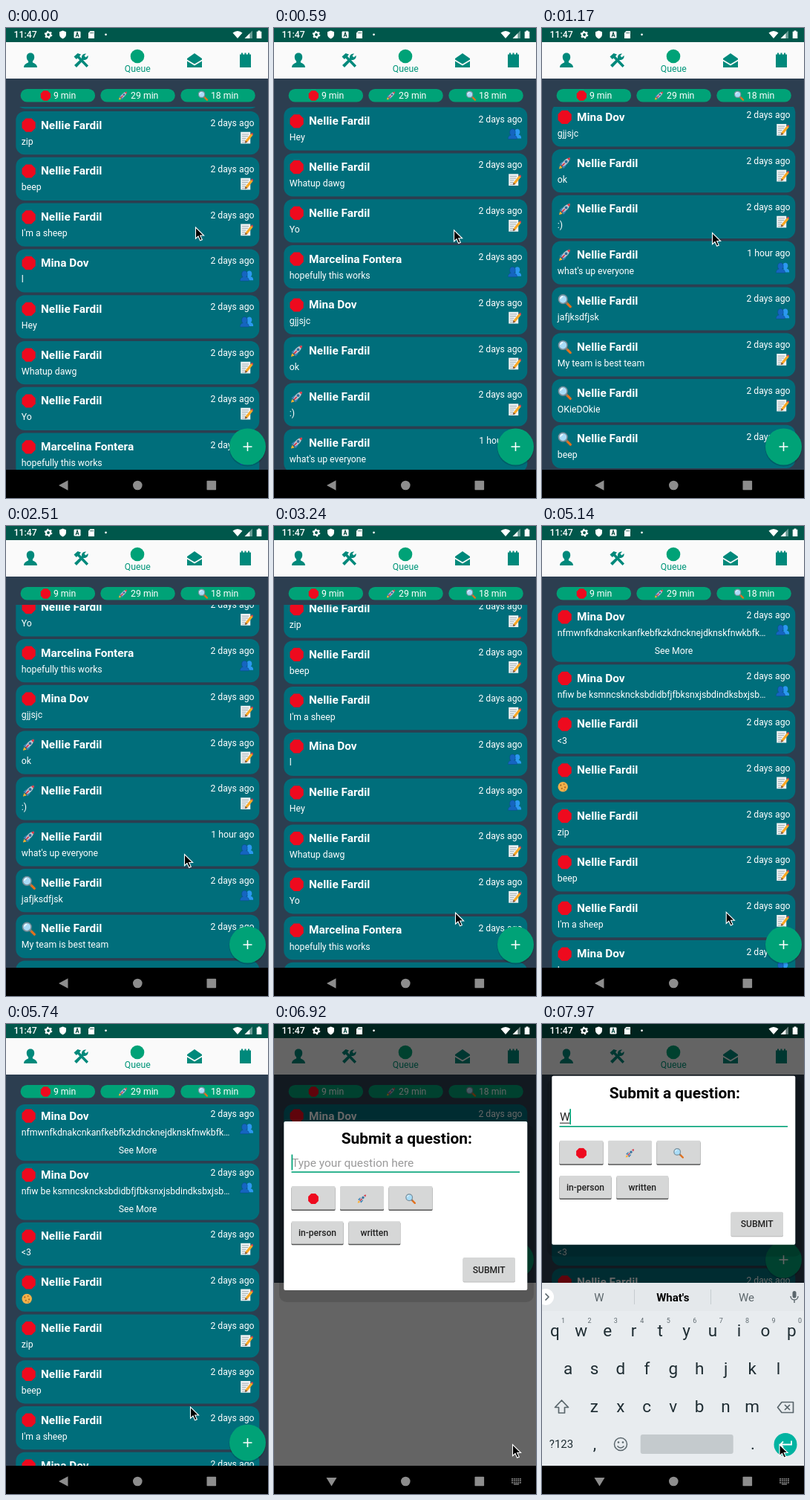
Write an HTML page that moves like this. It is 353x632 px and loops after 8000 ms.

```html
<!DOCTYPE html>
<html lang="en">
<head>
<meta charset="utf-8">
<title>Queue</title>
<style>
html, body { margin: 0; width: 100%; height: 100%; overflow: hidden; background: #000; }
svg { display: block; }
#stage { width: 353px; height: 632px; }
text { font-family: Roboto, sans-serif; font-size: 12.25px; fill: #fff; }
.name { font-size: 15.4px; font-weight: 700; }
.end { text-anchor: end; }
.mid { text-anchor: middle; }
.btn { font-size: 12.1px; font-weight: 500; fill: #222; text-anchor: middle; }
.key { font-size: 22.5px; fill: #1f2d33; text-anchor: middle; }
.hint { font-size: 9px; fill: #5f6a70; text-anchor: middle; }
.word { font-size: 15px; fill: #5c666b; text-anchor: middle; }
</style>
</head>
<body>
<svg id="stage" viewBox="0 0 353 632">
  <defs>
    <symbol id="stop" viewBox="0 0 20 20">
      <path d="M6 .5h8L19.5 6v8L14 19.5H6L.5 14V6z" fill="#ee0a1e"/>
    </symbol>
    <symbol id="rocket" viewBox="0 0 20 20">
      <path d="M2 18l1.500-5 3.500 3.500z" fill="#ffb02e"/>
      <path d="M2.500 11.500l4-3.500 3 1-4 4.500zM8.500 17.500l3.500-4-1-3-4.500 4.500z" fill="#3f83b5"/>
      <path d="M5.500 12.500C7.500 7 12 3 17.500 2.500 17 8 13 12.500 7.500 14.500z" fill="#b9c6ce"/>
      <path d="M13.500 3.500c1.300-.6 2.600-.9 4-1 0 1.400-.4 2.700-1 4z" fill="#e0313f"/>
      <circle cx="12" cy="8" r="2" fill="#2f6d9b"/>
      <path d="M6 14l4-4" stroke="#d7263d" stroke-width="1.600"/>
    </symbol>
    <symbol id="lens" viewBox="0 0 20 20">
      <path d="M12 12l6 6" stroke="#e2711d" stroke-width="3.400" stroke-linecap="round"/>
      <path d="M11 11l2.500 2.500" stroke="#697b86" stroke-width="2"/>
      <circle cx="7.500" cy="7.500" r="6" fill="#a9dcf7" stroke="#7b909c" stroke-width="1.700"/>
      <path d="M4 7c.3-2 1.500-3 3.500-3.200" stroke="#fff" stroke-width="1.300" fill="none"/>
    </symbol>
    <symbol id="memo" viewBox="0 0 20 20">
      <path d="M1 1.500h14.500v17.500H1z" fill="#eef1f2"/>
      <path d="M3 5h10M3 8h9M3 11h6M3 14h5M3 17h8" stroke="#9aa7ad" stroke-width="1"/>
      <path d="M8 14.500L16.500 4l2.800 2.200L11 16.500 7.500 18z" fill="#f9a825"/>
      <path d="M16.500 4l1.200-1.500 2.300 2-.7 1.700z" fill="#e53950"/>
      <path d="M8 14.500l3 2L7.500 18z" fill="#6d4c41"/>
    </symbol>
    <symbol id="busts" viewBox="0 0 20 20">
      <path d="M8 17c0-4 2-5 4-5.500-1.500-1-1.800-2.500-1.800-4C10.200 4.500 11.800 3 14 3s3.800 1.500 3.800 4.500c0 1.500-.5 3-1.800 4 2 .5 4 1.500 4 5.500z" fill="#2b98f0"/>
      <path d="M0 18c0-4 2-5.200 4.300-5.800C3 11 2.600 9.700 2.600 8 2.600 4.700 4.300 3 6.800 3S11 4.700 11 8c0 1.700-.5 3-1.800 4.200 2.300.6 4.300 1.800 4.300 5.800z" fill="#1565c0" stroke="#0b4a8c" stroke-width=".6"/>
    </symbol>
    <symbol id="cookie" viewBox="0 0 20 20">
      <circle cx="10" cy="10" r="9.300" fill="#f2b04a"/>
      <g fill="#a9651f"><circle cx="6" cy="7" r="1.500"/><circle cx="12" cy="5" r="1.200"/><circle cx="14" cy="11" r="1.500"/><circle cx="8" cy="13" r="1.400"/><circle cx="12.500" cy="16" r="1"/></g>
    </symbol>
    <clipPath id="appClip"><rect id="appBox" width="353" height="594"/></clipPath>
    <clipPath id="listClip"><rect y="106" width="353" height="488"/></clipPath>
  </defs>

  <rect width="353" height="594" fill="#fafafa"/>
  <g clip-path="url(#appClip)">
    <rect width="353" height="594" fill="#2c3e50"/>
    <rect y="19" width="353" height="49" fill="#fafafa"/>
    <rect width="353" height="19" fill="#00574b"/>
    <g fill="#00897b">
      <path d="M33 33.500c-3.600 0-5.400 2.600-5.200 6 .1 2.300 1 4 2.300 5v1.700c-1 1.300-6 1.500-6.100 6.800h18c-.1-5.300-5.100-5.500-6.100-6.800v-1.700c1.300-1 2.200-2.700 2.300-5 .2-3.400-1.600-6-5.200-6z"/>
      <path d="M244 41l10-7 10 7v1.500l-10 6-10-6zM244 44.500l10 6 10-6V53h-20z"/>
      <path d="M315 35.500h2v-2h2v2h2.500v-2h2v2h2.500v-2h2v2h2V53h-15z"/>
      <path d="M91.500 38.500l5-4.500 4.500 1.500-2 2.500 12 12.500-2.500 2.500-12-12.500-1.800 1.500z"/>
      <path d="M92 50l10-9.500c-.5-3.500 2-6.500 6-6l-2.500 3 2 2 3-2.500c.8 3.500-2 6.500-6 6L95 53z"/>
    </g>
    <circle cx="177" cy="38" r="9.300" fill="#00a277"/>
    <text class="mid" x="177.300" y="59" style="fill:#00967a">Queue</text>
    <g id="chips"></g>
    <g clip-path="url(#listClip)">
      <g id="list"><g id="head"></g><g id="short"></g><g id="long"></g><g id="rest"></g></g>
    </g>
    <g id="fab">
      <circle cx="325.500" cy="564.500" r="25" opacity=".15"/>
      <circle cx="325.500" cy="563" r="24.500" fill="#00a277"/>
      <path d="M319.500 563h12M325.500 557v12" stroke="#fff" stroke-width="1.600"/>
    </g>
  </g>

  <rect id="dim" width="353" height="594" opacity=".6"/>
  <g id="dialog"></g>
  <g id="keyboard"></g>

  <g fill="#fff">
    <text x="10.500" y="13.300" style="font-weight:500">11:47</text>
    <circle cx="57" cy="9" r="3" fill="none" stroke="#fff" stroke-width="2.200"/>
    <circle cx="57" cy="9" r="4.500" fill="none" stroke="#fff" stroke-width="1.600" stroke-dasharray="2.200 2.512"/>
    <path d="M76.500 3.500l4.500 1.800v3.500c0 2.800-2 4.800-4.500 5.700-2.500-.9-4.500-2.900-4.500-5.700V5.300z"/>
    <rect x="91.500" y="4.500" width="9" height="9" rx="1.300"/>
    <path d="M113.500 4h5.500v10h-8V6.500z"/>
    <circle cx="134.500" cy="8.800" r="1.400"/>
    <path d="M305.500 6.500q6.500-5 13 0L312 14zM328.500 7v7h-7zM339.500 3.500h3v1.300h1.800V14h-6.600V4.800h1.800z"/>
    <path d="M332 3.500V14h-3.500V7z" opacity=".4"/>
  </g>
  <path d="M94 12l2-6 2 6M94.800 10.200h2.500" fill="none" stroke="#00453c" stroke-width="1.100"/>
  <path d="M113.700 5.500v2M115.500 5.500v2M117.300 5.500v2" stroke="#00453c" stroke-width=".8"/>

  <rect y="594" width="353" height="38"/>
  <g fill="#8d8d8d">
    <path id="back" d="M71 615l12.500-6.700v13.400z"/>
    <circle cx="177.300" cy="615" r="6.300"/>
    <rect x="270.500" y="608.700" width="12.600" height="12.600" rx=".8"/>
    <g id="keysIcon">
      <path d="M320 611h13v1.500h-13zM320 613.500h13v1.500h-13zM320 616h13v1.500h-13zM323 618.300h7v1.200h-7z"/>
      <path d="M322.500 611v6.500M325.200 611v6.500M327.900 611v6.500M330.600 611v6.500" stroke="#000" stroke-width=".8"/>
    </g>
  </g>
  <path id="cursor" d="M0 0v15.200l3.500-3.200 2.600 5.800 2.700-1.200-2.600-5.600h4.900z" stroke="#fff" stroke-width="1.100"/>
</svg>

<script>
const $ = id => document.getElementById(id);
const esc = s => s.replace(/&/g, '&amp;').replace(/</g, '&lt;');
const label = (x, y, s, cls = '', style = '') =>
  `<text x="${x}" y="${y}" class="${cls}" style="${style}">${esc(s)}</text>`;
const icon = (id, cx, cy, size) =>
  `<use href="#${id}" x="${cx - size / 2}" y="${cy - size / 2}" width="${size}" height="${size}"/>`;
const box = (x, y, w, h, fill, r = 0) =>
  `<rect x="${x}" y="${y}" width="${w}" height="${h}" rx="${r}" fill="${fill}"/>`;
const show = (id, on) => { $(id).style.display = on ? '' : 'none'; };
const move = (id, x, y) => $(id).setAttribute('transform', `translate(${x} ${y})`);

// Queue list
const TOP = 108, ROW = 61.8, TALL = 79.4, GROW = TALL - ROW;
const A = 'Nellie Fardil', B = 'Mina Dov', C = 'Marcelina Fontera';
const LONG = [
  'nfmwnfkdnakcnkanfkebfkzkdncknejdknskfnwkbfk…',
  'nfiw be ksmncskncksbdidbfjfbksnxjsbdindksbxjsb…'
];
const rows = [
  [A, 'stop', '<3', 'memo'], [A, 'stop', '', 'memo'], [A, 'stop', 'zip', 'memo'],
  [A, 'stop', 'beep', 'memo'], [A, 'stop', "I'm a sheep", 'memo'], [B, 'stop', 'l', 'busts'],
  [A, 'stop', 'Hey', 'busts'], [A, 'stop', 'Whatup dawg', 'memo'], [A, 'stop', 'Yo', 'memo'],
  [C, 'stop', 'hopefully this works', 'busts'], [B, 'stop', 'gjjsjc', 'memo'],
  [A, 'rocket', 'ok', 'memo'], [A, 'rocket', ':)', 'memo'],
  [A, 'rocket', "what's up everyone", 'busts', '1 hour ago'],
  [A, 'lens', 'jafjksdfjsk', 'busts'], [A, 'lens', 'My team is best team', 'memo'],
  [A, 'lens', 'OKieDOkie', 'memo'], [A, 'lens', 'beep', 'memo']
];

function card(y, [name, level, msg, mode, age = '2 days ago'], tall) {
  const up = tall ? 3 : 0;
  return `<g transform="translate(0 ${y})">` +
    box(13.3, 0, 328, tall ? 76 : 58.2, '#006e7b', 12) +
    `<g transform="translate(0 ${-up})">` +
    icon(level, 30.6, 18.7, 19.2) + label(47, 23.5, name, 'name') +
    label(334.5, 20, age, 'end') + icon(mode, 324.3, 35.5, 18) +
    (msg ? label(20.8, 44.7, msg) : icon('cookie', 28.2, 41, 14.5)) + '</g>' +
    (tall ? label(177.5, 65.5, 'See More', 'mid') : '') + '</g>';
}

const second = [B, 'stop', LONG[1], 'busts'];
$('head').innerHTML = card(TOP, [B, 'stop', LONG[0], 'busts'], true);
$('short').innerHTML = card(TOP + TALL, second, false);
$('long').innerHTML = card(TOP + TALL, second, true);
$('rest').innerHTML = rows.map((r, i) => card(TOP + TALL + ROW * (i + 1), r, false)).join('');

$('chips').innerHTML = [['stop', 9, 19.6, 53.3], ['rocket', 29, 127.3, 157.5], ['lens', 18, 235.3, 265.3]]
  .map(([id, n, x, cx]) => box(x, 82, 100.5, 17.5, '#00a277', 8.7) +
    icon(id, cx, 91, 14) + label(cx + 10.6, 95.3, n + ' min')).join('');

// Question dialog, drawn with its top edge at 0
const button = (x, y, w, h) =>
  box(x, y + 1.5, w, h, '#555', 1.5) + box(x, y, w, h, '#d6d7d7', 1.5);
$('dialog').innerHTML =
  box(7, 4, 343, 239, 'rgba(0,0,0,.13)', 10) + box(13.3, 0, 328, 227, '#fff', 2) +
  label(178.8, 30, 'Submit a question:', 'mid', 'font-size:20.9px;font-weight:700;fill:#000') +
  `<g id="hint">${label(24, 61, 'Type your question here', '', 'font-size:15.5px;fill:#9a9a9a')}</g>` +
  `<g id="typed">${label(24, 60.7, 'W', '', 'font-size:15.5px;fill:#222')}${box(24, 63, 13.5, 1, '#222')}</g>` +
  `<rect id="caret" y="44.500" width="1.700" height="21" fill="#00a277"/>` +
  box(23.5, 67.3, 307.5, 1.6, '#00a277') +
  ['stop', 'rocket', 'lens'].map((id, i) =>
    button(23.5 + 65.5 * i, 87, 59, 31.5) + icon(id, 53 + 65.5 * i, 104, 14.5)).join('') +
  button(23.5, 134.3, 70, 30.5) + label(58.5, 154.3, 'in-person', 'btn') +
  button(100.3, 134.3, 70, 30.5) + label(135.3, 154.3, 'written', 'btn') +
  box(254.5, 184, 70.5, 32.5, '#bbb', 2) + box(254.5, 183, 70.5, 32.5, '#d6d7d7', 2) +
  label(289.7, 203.7, 'SUBMIT', 'btn');

// On-screen keyboard
const PITCH = 35.45;
const keyRow = (s, x, y) => [...s].map((c, i) => label(x + PITCH * i, y, c, 'key')).join('');
const line = (d, w = 1.7) =>
  `<path d="${d}" fill="none" stroke="#5a666c" stroke-width="${w}" stroke-linejoin="round"/>`;
$('keyboard').innerHTML =
  box(0, 348, 353, 246, '#e8ecef') + box(0, 348, 353, 38, '#e4e8eb') +
  '<circle cx="5" cy="367" r="11" fill="#fff"/>' + line('M4.500 362.500l4.500 4.500-4.500 4.500') +
  '<g id="words">' + label(77, 373.2, 'W', 'word') +
  label(176.3, 373.2, "What's", 'word', 'font-weight:700;fill:#000') + label(275.5, 373.2, 'We', 'word') +
  box(124, 357, 1, 20, '#c6ccd0') + box(227, 357, 1, 20, '#c6ccd0') + '</g>' +
  box(337.5, 359, 5, 9.5, '#5a666c', 2.5) + line('M335 366c0 6.500 10 6.500 10 0M340 371v4', 1.4) +
  keyRow('qwertyuiop', 17.3, 419.5) + keyRow('asdfghjkl', 35, 470.5) + keyRow('zxcvbnm', 70.3, 522) +
  [...'1234567890'].map((c, i) => label(28.5 + PITCH * i, 402, c, 'hint')).join('') +
  line('M26.500 506l9 9.500h-5v7.500h-8v-7.500h-5z') +
  line('M323 508.500h15.500v14H323l-5.500-7zM327 512l7 7M334 512l-7 7') +
  label(26, 570.3, '?123', 'key', 'font-size:15px') + label(71, 572, ',', 'key') + label(284, 572, '.', 'key') +
  line('M97.500 565a8.500 8.500 0 1 0 17 0a8.500 8.500 0 1 0-17 0M101.500 567.500q4.500 5 9 0', 1.5) +
  '<g fill="#5a666c"><circle cx="103" cy="562.500" r="1.300"/><circle cx="109" cy="562.500" r="1.300"/></g>' +
  box(132.7, 552, 125, 26, '#c4cacd', 3) +
  '<circle cx="328" cy="565.500" r="15.500" fill="#00b3a1"/>' +
  '<path d="M336 560.500v5h-15M325 561.500l-4 4 4 4" fill="none" stroke="#fff" stroke-width="1.800"/>';

// Motion: the screen refreshes once per STEP; keys are [step, values, easing]
const LOOP = 8000, STEP = 147.2, LAG = 12;
const ease = {
  line: p => p,
  in: p => Math.pow(p, 1.6),
  out: p => 1 - Math.pow(1 - p, 1.5),
  both: p => (1 - Math.cos(Math.PI * p)) / 2
};

function track(keys, k) {
  if (k <= keys[0][0]) return keys[0][1];
  let i = 0;
  while (i < keys.length - 1 && keys[i + 1][0] <= k) i++;
  const [k0, v0] = keys[i], next = keys[i + 1];
  if (!next) return v0;
  const p = ease[next[2] || 'line']((k - k0) / (next[0] - k0));
  return v0.map((v, j) => v + (next[1][j] - v) * p);
}

const scroll = [[0, [260.8]], [8, [766], 'both'], [12, [766]], [17, [653.4], 'in'],
  [28, [28.8], 'out'], [36, [0], 'out']];
const pointer = [[0, [255.5, 268]], [8, [229.5, 275.5], 'both'], [10, [233.5, 328], 'both'], [12, [233.5, 328]],
  [17, [240.5, 441.5], 'in'], [22, [244.5, 520], 'out'], [28, [247.5, 529.5], 'out'],
  [39, [248.5, 515], 'both'], [40, [248.5, 515]], [44, [321.5, 565.5], 'both'], [47, [321.5, 565.5]],
  [48, [320, 565.5]]];
const sheet = [[46, [193]], [47, [131]], [48, [80]], [49, [69.7]]];
const panel = [[47, [246]], [48, [10]], [49, [0]]];
const shade = [[43, [0]], [45, [1]]];

function draw(t) {
  const k = Math.floor((t + LAG) / STEP);
  const grown = k >= 37, small = k >= 47, typed = k >= 53;

  move('list', 0, -track(scroll, k)[0]);
  show('short', !grown);
  show('long', grown);
  move('rest', 0, grown ? GROW : 0);

  $('appBox').setAttribute('height', small ? 348 : 594);
  move('fab', 0, small ? -246 : 0);
  $('back').setAttribute('d', small ? 'M70.500 610h14l-7 11.500z' : 'M71 615l12.500-6.700v13.400z');
  show('keysIcon', small);

  const fade = track(shade, k)[0];
  $('dim').setAttribute('opacity', 0.6 * fade);
  $('dialog').setAttribute('opacity', fade);
  move('dialog', 0, track(sheet, k)[0]);
  show('hint', !typed);
  show('typed', typed);
  $('caret').setAttribute('x', typed ? 37.3 : 23.5);

  show('keyboard', k > 47);
  move('keyboard', 0, track(panel, k)[0]);
  show('words', k >= 54);

  move('cursor', ...track(pointer, k));
}

const start = performance.now();
function tick() {
  draw((performance.now() - start) % LOOP);
  requestAnimationFrame(tick);
}
tick();
</script>
</body>
</html>
```
